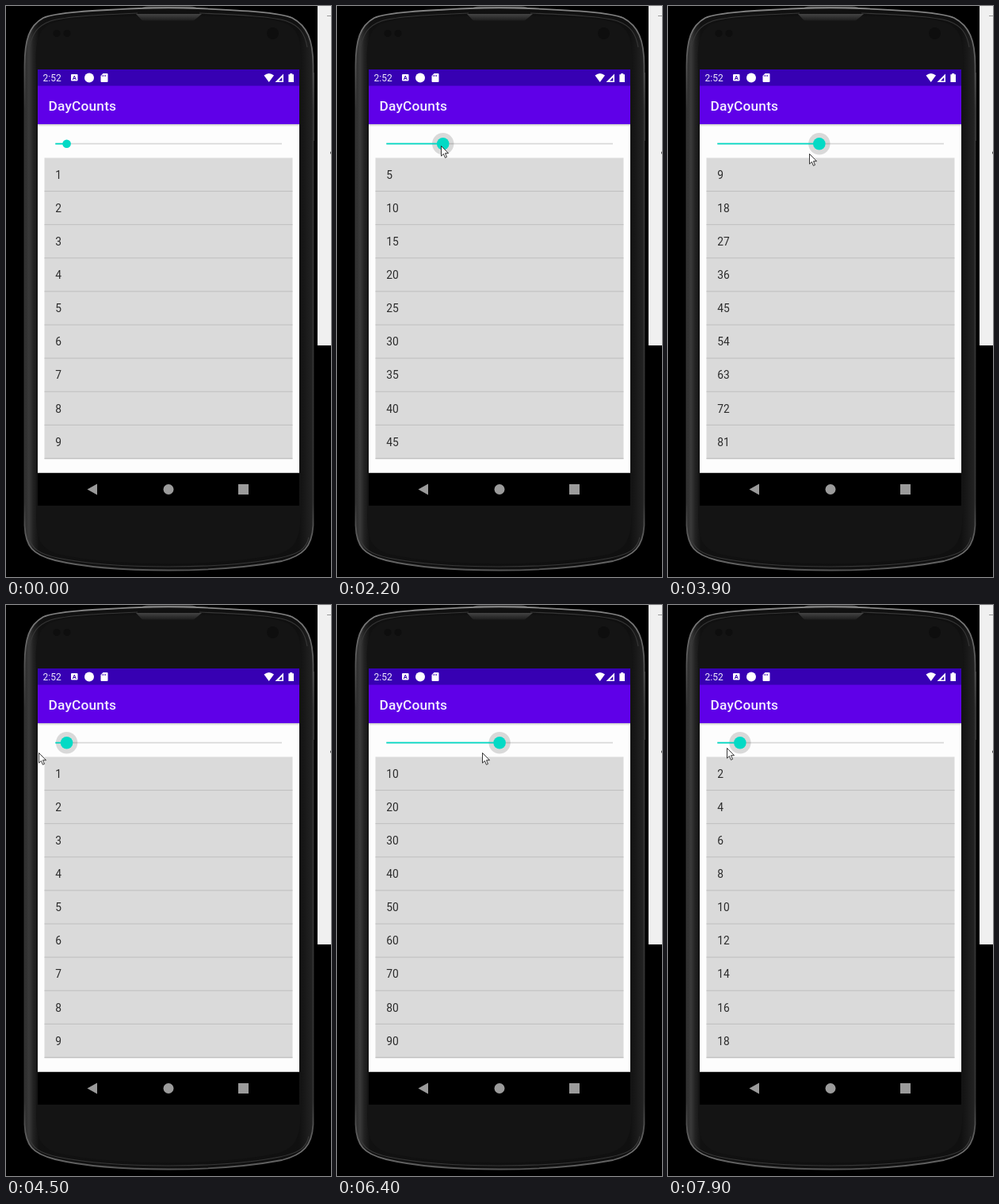
Recreate the animation shown at these times as an HTML page. Size 410 px wide and 720 px high, loop 8 s.

```html
<!DOCTYPE html>
<html lang="en">
<head>
<meta charset="utf-8">
<title>Multiples slider</title>
<style>
  html, body { margin: 0; width: 100%; height: 100%; overflow: hidden; background: #000; }
  svg { display: block; }
  text { font-family: Roboto, "Noto Sans", sans-serif; }
  .title { font-size: 17.3px; font-weight: 500; fill: #f4efff; letter-spacing: .2px; }
  .clock { font-size: 12px; fill: #eee8fb; }
  .row { font-size: 13.75px; fill: #2b2b2b; }
</style>
</head>
<body>
<svg width="410" height="720" viewBox="0 0 410 720">
  <defs>
    <linearGradient id="rim">
      <stop offset="0" stop-color="#2c2c2c"/>
      <stop offset=".015" stop-color="#3a3a3a"/>
      <stop offset=".03" stop-color="#222"/>
      <stop offset=".05" stop-color="#111"/>
      <stop offset=".95" stop-color="#101010"/>
      <stop offset="1" stop-color="#242424"/>
    </linearGradient>
    <linearGradient id="edge" x2="0" y2="1">
      <stop offset="0" stop-color="#858585"/>
      <stop offset=".06" stop-color="#686868"/>
      <stop offset=".18" stop-color="#343434"/>
      <stop offset=".88" stop-color="#343434"/>
      <stop offset=".97" stop-color="#707070"/>
      <stop offset="1" stop-color="#555"/>
    </linearGradient>
    <linearGradient id="grille" x2="0" y2="1">
      <stop offset="0" stop-color="#444"/>
      <stop offset="1" stop-color="#1c1c1c"/>
    </linearGradient>
    <linearGradient id="shadow" x2="0" y2="1">
      <stop offset="0" stop-opacity=".28"/>
      <stop offset="1" stop-opacity="0"/>
    </linearGradient>
  </defs>

  <!-- window behind the phone -->
  <rect x="393" width="17" height="428" fill="#f0f0f0"/>
  <path d="M405 12.5h5" stroke="#999"/>
  <circle cx="411" cy="185" r="2" fill="#444"/>

  <!-- phone body -->
  <path d="M387 84h2v86h-2z" fill="#343434"/>
  <path d="M168 4Q172 .5 180 .5H232Q240 .5 244 4Z" fill="#555"/>
  <path d="M23.500 75C23.500 43 29 25 47 15C62 8 110 5.500 168 3Q205 1.500 242 3C300 5.500 345 8 361 15C380 25 387.500 43 387.500 75V655C386 682 375 693 348 700C300 709 250 711.500 205 711.500C150 711.500 100 708 62 699C34 692 24.500 682 23.500 655Z"
        fill="url(#rim)" stroke="url(#edge)" stroke-width="1.8"/>
  <path d="M38 80C37 48 39 32 55 23C75 14 125 13 205 12C285 13 335 14 355 23C371 32 373 48 372 80V640C371 672 365 684 344 691C300 700 250 703 205 703C155 703 105 700 66 691C43 684 38 672 38 640Z" fill="#141414"/>
  <path d="M29 670C32 684 42 691 65 696C105 704 155 707 205 707C255 707 305 704 345 696C370 691 379 684 382 670M30 52C33 34 40 25 56 19C75 13 120 11 166 9M244 9C290 11 335 13 354 19C370 25 377 34 380 52"
        fill="none" stroke="#363636" stroke-width="1.2"/>
  <path d="M164 10H247L238 17.500Q237 18.500 235 18.500H175Q172 18.500 171 17.500Z" fill="url(#grille)"/>
  <g fill="#0e0e0e">
    <circle cx="64" cy="34.500" r="4.500"/>
    <circle cx="77" cy="34.500" r="4.500"/>
    <circle cx="336.500" cy="34.500" r="7.500"/>
  </g>

  <!-- screen -->
  <rect x="40" y="80" width="330" height="550"/>
  <rect x="40" y="140" width="330" height="448.750" fill="#fdfdfd"/>
  <rect x="40" y="148" width="330" height="4" fill="url(#shadow)"/>
  <rect x="40" y="100" width="330" height="49" fill="#5f00e8"/>
  <rect x="40" y="80" width="330" height="20.600" fill="#3700b3"/>
  <text class="clock" x="46.500" y="95">2:52</text>
  <text class="title" x="53.500" y="132">DayCounts</text>

  <g fill="#fff">
    <rect x="82" y="86" width="8.500" height="8.500" rx="1"/>
    <circle cx="105" cy="90.500" r="6"/>
    <path d="M122.500 85h5q1 0 1 1v9q0 1-1 1h-7q-1 0-1-1v-7z"/>
    <path d="M325.500 87.500Q331.700 82.500 338 87.500L331.700 96Z"/>
    <path d="M350 85.500V96H339.500Z"/>
    <path d="M358.200 85h3v1.200h1.800v9.800h-6.600v-9.800h1.800z"/>
  </g>
  <path d="M84.300 93l2-5 2 5M85 91.500h2.600" fill="none" stroke="#3700b3"/>
  <path d="M121.500 87v2M123.500 87v2M125.500 87v2" stroke="#3700b3" stroke-width=".8"/>
  <path d="M348.300 90v4.500H344z" fill="#3700b3"/>

  <g fill="#9b9b9b">
    <path d="M102.500 609.500L115 602.500V616.500Z"/>
    <circle cx="205" cy="609.500" r="6.500"/>
    <rect x="293" y="603" width="13" height="13"/>
  </g>

  <rect x="48.500" y="191.500" width="313" height="380" fill="#dadada"/>
  <g id="list"></g>

  <!-- slider -->
  <path d="M62.300 173.700H348" stroke="#d9d9d9" stroke-width="1.8"/>
  <circle id="halo" cy="173.700" r="13.700" fill-opacity=".14"/>
  <path id="fill" stroke="#03dac5" stroke-width="1.8"/>
  <circle id="thumb" cy="173.700" fill="#03dac5"/>

  <path id="cursor" d="M.5 .5V13.200L3.400 10.500L5.400 15.300L7.500 14.400L5.500 9.700H9.500Z"
        fill="#fff" stroke="#222" stroke-width=".9"/>
</svg>
<script>
  const LOOP = 8000, STEP = 100, ENTER = 100, PRESS = 1800, LAG = 60;
  const LEFT = 62.3, UNIT = 14.28, ROW = 42.1;
  const $ = id => document.getElementById(id);
  const clamp = (v, lo, hi) => Math.max(lo, Math.min(hi, v));
  const progress = (t, from, to) => clamp((t - from) / (to - from), 0, 1);
  const ramp = (t, from, to) => {
    const p = progress(t, from, to);
    return p * p * (3 - 2 * p);
  };

  // pointer drags: each moves on to x between two times and rests until the next
  const drags = [
    { from: 100, to: 900, x: 92 },
    { from: 900, to: 1800, x: 78 },
    { from: 1800, to: 2150, x: 131 },
    { from: 2400, to: 3200, x: 386 },
    { from: 3200, to: 3400, x: 351 },
    { from: 3500, to: 3850, x: 190 },
    { from: 3850, to: 4450, x: 41 },
    { from: 4700, to: 5150, x: 308 },
    { from: 5150, to: 5500, x: 352 },
    { from: 5600, to: 6000, x: 210 },
    { from: 6320, to: 6800, x: 45 },
    { from: 6900, to: 7300, x: 352 },
    { from: 7500, to: 7600, x: 380 },
    { from: 7600, to: 7830, x: 96 },
    { from: 7830, to: 8000, x: 42 }
  ];

  const pointerX = t => drags.reduce((x, d) => x + (d.x - x) * progress(t, d.from, d.to), 375);

  // rises into view, then drifts a little below the track and partly back
  const pointerY = t => 176 + 482 * (1 - progress(t, ENTER, 900))
    + 10 * ramp(t, 2600, 3900) - 6 * ramp(t, 7000, 7900);

  // the thumb trails the pointer slightly and never drops below 1
  const sliderValue = t =>
    t < PRESS ? 1 : clamp(Math.round((pointerX(t - LAG) - LEFT) / UNIT), 1, 20);

  function add(tag, attrs) {
    const el = document.createElementNS("http://www.w3.org/2000/svg", tag);
    for (const name in attrs) el.setAttribute(name, attrs[name]);
    return $("list").appendChild(el);
  }

  const rows = Array.from({ length: 9 }, (_, i) => {
    const y = 191.5 + ROW * (i + 1);
    add("path", { d: `M48.5 ${y}H361.5`, stroke: "#bebebe" });
    return add("text", { class: "row", x: 62.3, y: 217.8 + ROW * i });
  });

  function draw(time) {
    const t = Math.floor((time % LOOP) / STEP) * STEP;
    const n = sliderValue(t), x = LEFT + UNIT * n, pressed = t >= PRESS;
    rows.forEach((row, i) => { row.textContent = n * (i + 1); });
    $("fill").setAttribute("d", `M${LEFT} 173.7H${x}`);
    $("thumb").setAttribute("cx", x);
    $("thumb").setAttribute("r", pressed ? 7.8 : 5.3);
    $("halo").setAttribute("cx", x);
    $("halo").style.display = pressed ? "" : "none";

    const cx = Math.round(pointerX(t)), cy = Math.round(pointerY(t));
    $("cursor").setAttribute("transform", `translate(${cx} ${cy})`);
    $("cursor").style.display = t < ENTER ? "none" : "";
  }

  const start = performance.now();
  function tick() {
    draw(performance.now() - start);
    requestAnimationFrame(tick);
  }
  tick();
</script>
</body>
</html>
```
